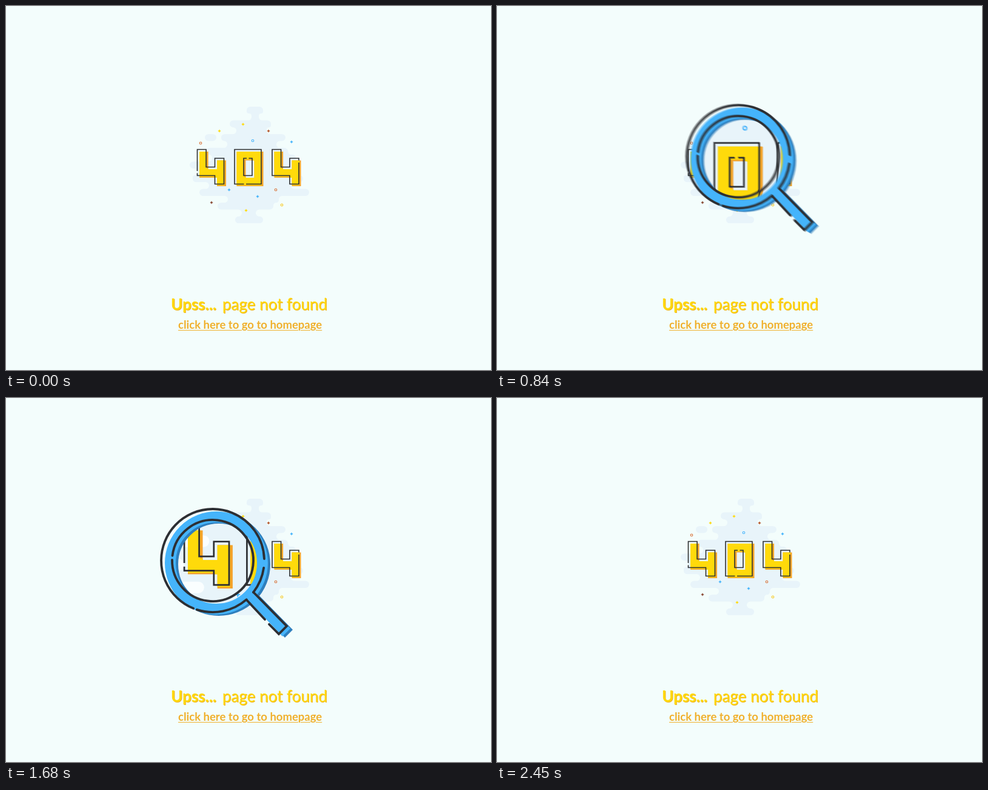
An HTML page with a canvas for the animation above (4.45 s loop, 800 by 600 pixels).

```html
<!DOCTYPE html>
<html lang="en">
<head>
<meta charset="utf-8">
<title>404</title>
<style>
  html, body { margin: 0; width: 100%; height: 100%; overflow: hidden; background: #f3fdfc; }
  canvas { position: absolute; left: 0; top: 0; }
  p { position: absolute; margin: 0; white-space: nowrap; line-height: 1.2; font-family: Lato, "Open Sans", sans-serif; }
  .title { left: 272px; top: 476px; font-size: 26px; color: #ffd90c; text-shadow: 1px 1px #efb321; }
  .title b { margin-right: 3px; }
  .link { left: 284px; top: 514px; font-size: 18.5px; font-weight: bold; color: #f0b02c;
    text-decoration: underline 1px; text-underline-offset: 2px; }
</style>
</head>
<body>
<canvas id="stage" width="800" height="600"></canvas>
<p class="title"><b>Upss...</b> page not found</p>
<p class="link">click here to go to homepage</p>
<script>
const LOOP = 4450, STEP = 70, END = 2450, SHUTTER = 22, SAMPLES = 12;
const ZOOM = 1.68, PAPER = '#f3fdfc', INK = '#2d2f33', YELLOW = '#ffda0b', ORANGE = '#f5a32a', BLUE = '#45b4fb';

const stage = document.getElementById('stage').getContext('2d');
const layer = document.createElement('canvas');
layer.width = 800;
layer.height = 600;
const c = layer.getContext('2d');

// ---------- shapes ----------
function polygon(points, dx = 0, dy = 0, path = new Path2D()) {
  points.forEach(([x, y], i) => path[i ? 'lineTo' : 'moveTo'](x + dx, y + dy));
  path.closePath();
  return path;
}

function rounded(points, radius) {
  const path = new Path2D(), n = points.length;
  const mid = (a, b) => [(a[0] + b[0]) / 2, (a[1] + b[1]) / 2];
  const half = (a, b) => Math.hypot(a[0] - b[0], a[1] - b[1]) / 2;
  path.moveTo(...mid(points[n - 1], points[0]));
  points.forEach((p, i) => {
    const a = points[(i + n - 1) % n], b = points[(i + 1) % n];
    path.arcTo(...p, ...mid(p, b), Math.min(radius, half(a, p), half(p, b)));
  });
  path.closePath();
  return path;
}

// left and right edge of each cloud row
const rows = [[397, 424], [405, 417], [369, 437], [380, 430], [355, 461], [365, 446], [330, 465], [340, 478],
  [303, 486], [315, 478], [308, 490], [335, 470], [319, 500], [366, 450], [349, 441], [389, 412], [378, 424]];
const rowY = i => 166 + i * 11.3;
const side = k => rows.flatMap((r, i) => [[r[k], rowY(i)], [r[k], rowY(i + 1)]]);
const cloud = rounded([...side(1), ...side(0).reverse()], 5.6);
cloud.roundRect(328, rowY(4), 19, 11.3, 5.6);

const four = [[0, 0], [14.6, 0], [14.6, 29], [29, 29], [29, 14.5], [44, 14.5], [44, 57], [29, 57], [29, 43], [0, 43]];
const box = [[0, 0], [44, 0], [44, 57], [0, 57]];
const hole = [[15, 14.5], [29, 14.5], [29, 43], [15, 43]];

// each outline carries the length at which its small gap begins
const digits = [
  { x: 315.5, outlines: [[four, 192]] },
  { x: 377, outlines: [[box, 126], [hole, 5]] },
  { x: 439, outlines: [[four, 91]] }
];

const stars = [[352, 206, YELLOW], [391, 195, YELLOW], [396, 337, YELLOW], [433, 206, '#b5552c'],
  [339, 324, '#8a4a35'], [471, 224, BLUE], [368, 303, BLUE], [415, 314, BLUE]];
const rings = [[321, 226, '#d9743a'], [445, 303, '#d9743a'], [407, 222, BLUE], [455, 328, '#f7c81e']];

function drawDigit({ x, outlines }) {
  const shape = (dx, dy) => {
    const path = new Path2D();
    outlines.forEach(([points]) => polygon(points, x + dx, 236.5 + dy, path));
    return path;
  };
  const body = shape(3.5, 3.5);
  c.fillStyle = ORANGE;
  c.fill(body, 'evenodd');
  c.save();
  c.clip(body, 'evenodd');
  c.fillStyle = YELLOW;
  c.fill(shape(1, 2), 'evenodd');
  c.restore();
  c.strokeStyle = INK;
  c.lineWidth = 1.6;
  c.lineCap = 'butt';
  for (const [points, gap] of outlines) {
    c.setLineDash([gap, 3.5, 999, 0]);
    c.stroke(polygon(points, x, 236.5));
  }
  c.setLineDash([]);
}

function drawPage(paper) {
  c.fillStyle = paper;
  c.fillRect(-800, -600, 2400, 1800);
  c.fillStyle = '#e8f4fa';
  c.fill(cloud);
  for (const [x, y, color] of stars) {
    c.fillStyle = color;
    c.fill(polygon([[0, -2.8], [0.9, -0.9], [2.8, 0], [0.9, 0.9], [0, 2.8], [-0.9, 0.9], [-2.8, 0], [-0.9, -0.9]], x, y));
  }
  c.lineWidth = 1.1;
  for (const [x, y, color] of rings) {
    c.strokeStyle = color;
    c.beginPath();
    c.arc(x, y, 1.8, 0, 7);
    c.stroke();
  }
  digits.forEach(drawDigit);
}

// ---------- magnifier ----------
function arc(r, from, to) {
  c.beginPath();
  c.arc(0, 0, r, from * Math.PI / 180, to * Math.PI / 180);
  c.stroke();
}

function drawBody(dx, dy, color) {
  c.save();
  c.translate(dx, dy);
  c.strokeStyle = c.fillStyle = color;
  c.lineWidth = 18;
  arc(76, 0, 360);
  c.fill(polygon([[53, 62], [109, 121], [122, 108], [64, 49]]));
  c.restore();
}

function drawMagnifier([x, y]) {
  const lx = x + 6, ly = y + 4;
  c.save();
  c.beginPath();
  c.arc(lx, ly, 70, 0, 7);
  c.clip();
  c.translate(lx, ly);
  c.scale(ZOOM, ZOOM);
  c.translate(-lx, -ly);
  drawPage('#fafeff');
  c.restore();

  c.save();
  c.translate(x, y);
  drawBody(10, 6, '#2f7fbd');
  drawBody(6, 4, BLUE);
  c.strokeStyle = INK;
  c.lineWidth = 3.8;
  c.lineCap = 'round';
  arc(85, 8, 38);
  arc(85, 49, 108);
  arc(85, 112, 358);
  arc(67, 187, 541);
  c.stroke(new Path2D('M56 65L86 97M93 105L109 121L122 108L67 52'));
  c.restore();
}

// ---------- motion ----------
const smooth = u => u * u * (3 - 2 * u);
const away = [895, 508];
const moves = [
  { from: 0, to: 560, path: [away, [434, 267]], ease: u => 1.09 * u * (1 - u) ** 2 + smooth(u) },
  { from: 560, to: 1120, path: [[434, 267], [412, 256], [385, 238], [360, 238]], ease: smooth },
  { from: 1120, to: 1680, path: [[360, 238], [331, 238], [322, 259], [341, 268]], ease: smooth },
  { from: 1680, to: END, path: [[341, 268], away], ease: u => u ** 2.14 }
];

function bezier(p, u) {
  if (p.length === 1) return p[0];
  return bezier(p.slice(1).map((b, i) => b.map((v, k) => p[i][k] + (v - p[i][k]) * u)), u);
}

function place(t) {
  const m = moves.find(m => t <= m.to);
  return bezier(m.path, m.ease((t - m.from) / (m.to - m.from)));
}

function render(time) {
  const t = Math.min(END, Math.floor(time / STEP) * STEP);
  const hidden = t === 0 || t === END;
  const count = hidden ? 1 : SAMPLES;
  // running average of the samples gives motion blur
  for (let i = 0; i < count; i++) {
    drawPage(PAPER);
    if (!hidden) drawMagnifier(place(t + ((i + 0.5) / count - 0.5) * SHUTTER));
    stage.globalAlpha = 1 / (i + 1);
    stage.drawImage(layer, 0, 0);
  }
}

const start = performance.now();
let last = -1;
function tick() {
  const time = (performance.now() - start) % LOOP;
  const step = Math.min(END / STEP, Math.floor(time / STEP));
  if (step !== last) render(time);
  last = step;
  requestAnimationFrame(tick);
}
tick();
</script>
</body>
</html>
```
